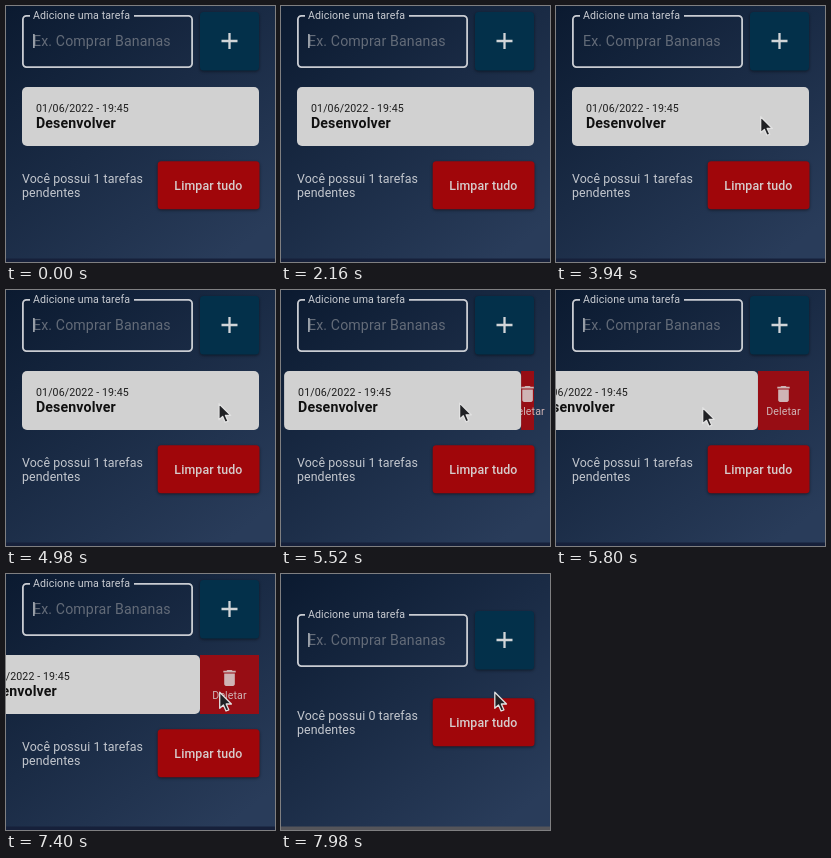
Animation, 269 px wide and 256 px high, one loop 8 s. Source, as an HTML page:

```html
<!DOCTYPE html>
<html lang="pt-BR">
<head>
<meta charset="utf-8">
<title>Lista de tarefas</title>
<style>
html, body { margin: 0; width: 100%; height: 100%; overflow: hidden; background: #1a2b46 }
svg { display: block; font: 10.62px Roboto, sans-serif; letter-spacing: .1px }
.body { font-size: 12.39px; letter-spacing: .08px; fill: #c3c7ce }
.input { font-size: 14.15px; letter-spacing: .13px }
.shadow { filter: drop-shadow(0 1.5px 1.5px #0007) }
</style>
</head>
<body>
<svg width="269" height="256" viewBox="0 0 269 256">
  <defs>
    <linearGradient id="sky" x1="0" y1="0" x2=".8" y2="1">
      <stop stop-color="#0b1a30"/>
      <stop offset="1" stop-color="#293c5a"/>
    </linearGradient>
  </defs>
  <rect width="269" height="256" fill="url(#sky)"/>
  <rect id="edge" y="252.500" width="269" height="3.500"/>

  <g id="form">
    <path d="M24 9.900H20.500a3.600 3.600 0 0 0-3.600 3.600v44a3.600 3.600 0 0 0 3.600 3.600h162a3.600 3.600 0 0 0 3.600-3.600v-44a3.600 3.600 0 0 0-3.600-3.600H128" fill="none" stroke="#c9ccd2" stroke-width="1.800"/>
    <text x="27" y="13" fill="#c9ccd2">Adicione uma tarefa</text>
    <text class="input" x="27" y="39.500" fill="#636b78">Ex. Comprar Bananas</text>
    <rect id="caret" x="27.300" y="28" width="1.200" height="14" fill="#d5d7db"/>
    <rect class="shadow" x="194" y="6" width="59" height="58.500" rx="3.500" fill="#03304a"/>
    <path d="M215.500 35h16M223.500 27v16" stroke="#d2d5d8" stroke-width="2.300"/>
  </g>

  <g id="task">
    <rect id="panel" y="81" height="59" fill="#970d14"/>
    <g id="remove" fill="#cfb4b5">
      <path transform="translate(-10.600 93.300) scale(.885)" d="M6 19c0 1.100.9 2 2 2h8c1.100 0 2-.9 2-2V7H6zM19 4h-3.500l-1-1h-5l-1 1H5v2h14z"/>
      <text y="125" text-anchor="middle">Deletar</text>
    </g>
    <g id="card">
      <rect x="16" y="81" width="237" height="59" rx="5" fill="#d1d1d1"/>
      <text x="30" y="105.500" fill="#1d1d1d">01/06/2022 - 19:45</text>
      <text class="input" x="30" y="122" font-weight="700" fill="#111">Desenvolver</text>
    </g>
  </g>

  <g id="footer">
    <text class="body" x="16" y="177"><tspan id="count"></tspan><tspan x="16" dy="14.300">pendentes</tspan></text>
    <rect class="shadow" x="151.700" y="155.300" width="101.800" height="48" rx="3.500" fill="#a0060a"/>
    <text class="body" x="202.400" y="184" text-anchor="middle" font-weight="500" style="letter-spacing:.12px;fill:#d6cccc">Limpar tudo</text>
  </g>

  <path id="pointer" d="M.8.8v16l3.700-3.300 2.600 6 2.800-1.200-2.600-5.800h5.200z" fill="#202124" stroke="#e2e2e2" stroke-width="1.300" stroke-linejoin="round"/>
</svg>
<script>
const LOOP = 8000, REMOVED = 7880, PANEL = 59;
const $ = id => document.getElementById(id);
const set = (id, attrs) => {
  for (const k in attrs) $(id).setAttribute(k, attrs[k]);
};
const move = (id, x, y) => set(id, { transform: `translate(${x} ${y})` });
const show = (id, on) => set(id, { visibility: on ? 'visible' : 'hidden' });
const mix = (a, b, u) => a + (b - a) * u;

// The screen refreshes in ticks; each move gives the pointer at its k-th tick
const drag = { start: 5260, tick: 90, ticks: 8, at: k => {
  const u = (k / 8) ** 2.5;
  return [mix(180, 110, u), mix(112, 122, u)];
} };
const moves = [
  { start: 2620, tick: 280, at: k => [91 + 25 * k, 74 + 88 * .07 ** k] },
  { start: 3380, tick: 280, at: k => [213 - 45 * .45 ** k, 113 - 28 * .33 ** k] },
  drag,
  { start: 6280, tick: 280, at: k => {
    const u = 1 / (1 + Math.exp(3.4 - 2.6 * k));
    return [mix(110, 213, u), mix(123, 117.5, u)];
  } }
];
const blinks = [1020, 2160, 3080, 4500, 5900, 6980];

const tickOf = ({ start, tick, ticks = Infinity }, t) =>
  Math.max(0, Math.min(ticks, Math.floor((t - start) / tick)));

// Width of the uncovered delete panel: follows the drag one tick late, easing out
function swipe(t) {
  const v = Math.max(0, tickOf(drag, t) - 1) / (drag.ticks - 1);
  return PANEL * (1 - (1 - v) ** 1.6);
}

function draw(now) {
  const t = now % LOOP;
  const removed = t >= REMOVED;
  const open = swipe(t);

  const current = moves.findLast(m => m.start <= t);
  show('pointer', current);
  if (current) move('pointer', ...current.at(tickOf(current, t)));
  show('caret', blinks.filter(b => b <= t).length % 2 === 0);

  move('card', -open, 0);
  set('panel', { x: 253 - open, width: open });
  move('remove', 253 - open / 2, 0);
  show('remove', open > 0);

  // The column is centred, so losing the card pulls both halves together
  set('task', { display: removed ? 'none' : 'inline' });
  move('form', 0, removed ? 31 : 0);
  move('footer', 0, removed ? -31 : 0);
  $('count').textContent = `Você possui ${removed ? 0 : 1} tarefas`;
  set('edge', { fill: removed ? '#55555a' : '#16203a' });
  requestAnimationFrame(draw);
}
draw(performance.now());
</script>
</body>
</html>
```
